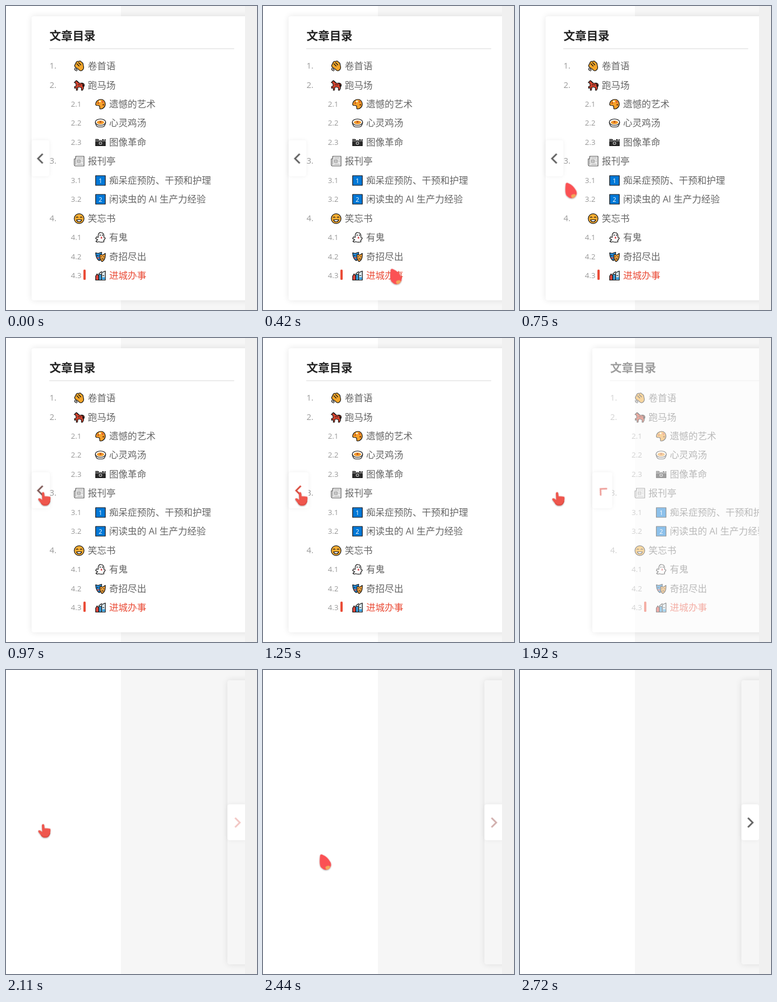
Animation of 441 by 534 pixels, one loop 3.31 s. Source, as an HTML page:

```html
<!DOCTYPE html>
<html lang="zh-CN">
<head>
<meta charset="utf-8">
<title>文章目录</title>
<style>
html, body { margin: 0; width: 100%; height: 100%; overflow: hidden; background: #fff; }
.page { position: absolute; left: 0; top: 0; width: 420px; height: 534px; overflow: hidden;
  background: linear-gradient(90deg, #fff 202px, #f6f6f6 202px); }
.scrollbar { position: absolute; left: 420px; top: 0; width: 21px; height: 534px; background: #f0f0f0; }
.panel { position: absolute; left: 45px; top: 18px; width: 390px; height: 499px; border-radius: 4px;
  box-shadow: 0 0 12px rgba(0,0,0,.1); animation-name: slide, clear; }
.content { position: absolute; inset: 0; animation-name: fade; }
.content svg { position: absolute; left: 0; top: 0; }
.toggle { position: absolute; left: 0; top: 218px; width: 31px; height: 63px; border-radius: 4px;
  background: #fff; box-shadow: 0 0 8px rgba(0,0,0,.06); 
  display: flex; align-items: center; justify-content: center; animation-name: widen; }
.toggle svg { flex: none; color: #606060; animation-name: tint; }
.toggle path { animation-name: turn; }
text { font-family: "Open Sans", "Noto Sans CJK SC", "Noto Sans CJK", sans-serif; font-size: 16.3px; fill: #666; }
.title { font-size: 20.2px; font-weight: 700; fill: #222; }
.num { font-size: 14.6px; fill: #999; }
.sub { font-size: 13.2px; }
.active { fill: #ea4d38; }
.icon { stroke: #151515; stroke-width: 1.2; stroke-linejoin: round; stroke-linecap: round; }
.icon text { font-size: 11px; fill: #fff; stroke: none; text-anchor: middle; }
.overlay { position: absolute; left: 0; top: 0; }
.cursor { animation-name: travel; }
.arrow { animation-name: arrow; }
.hand { visibility: hidden; animation-name: hand; }
.click { visibility: hidden; animation-name: click; }

.panel, .content, .toggle, .toggle svg, .toggle path, .cursor, .arrow, .hand, .click {
  animation-duration: 3310ms; animation-timing-function: linear;
  animation-iteration-count: infinite; animation-play-state: paused; }

@keyframes slide {
  0%, 56.8% { transform: translateX(0); animation-timing-function: ease; }
  63.7%, 100% { transform: translateX(344px); }
}
@keyframes turn {
  0%, 56.8% { transform: rotate(0deg); animation-timing-function: ease; }
  63.7%, 100% { transform: rotate(180deg); }
}
@keyframes clear {
  0%, 56.8% { background-color: #fff; }
  58% { background-color: rgba(255,255,255,.7); }
  62.5%, 100% { background-color: rgba(255,255,255,0); }
}
@keyframes fade {
  0%, 56.8% { opacity: 1; }
  58% { opacity: .44; }
  61.5%, 100% { opacity: 0; }
}
@keyframes widen {
  0%, 27% { width: 31px; }
  34%, 71.5% { width: 35px; }
  79%, 100% { width: 31px; }
}
@keyframes tint {
  0%, 27% { color: #606060; }
  36%, 56.8% { color: #d9483b; }
  58% { color: #ee9f9a; }
  63.7%, 71.5% { color: #f2c5c2; }
  81%, 100% { color: #606060; }
}
@keyframes travel {
  0%, 8.4% { transform: translate(312px, 516px); }
  12.4% { transform: translate(230px, 466px); }
  16.6% { transform: translate(146px, 402px); }
  20.5% { transform: translate(92px, 336px); }
  22.6% { transform: translate(80.5px, 311px); }
  24.8% { transform: translate(73px, 289px); }
  29%, 71% { transform: translate(65px, 270.5px); }
  71.6% { transform: translate(72px, 289px); }
  75.8% { transform: translate(128px, 358px); }
  80% { transform: translate(205px, 490px); }
  82%, 100% { transform: translate(225px, 560px); }
}
@keyframes arrow {
  0%, 8.4% { visibility: hidden; animation-timing-function: step-end; }
  8.41% { visibility: visible; animation-timing-function: step-end; }
  26.5% { visibility: hidden; animation-timing-function: step-end; }
  71.5% { visibility: visible; animation-timing-function: step-end; }
  82%, 100% { visibility: hidden; }
}
@keyframes hand {
  0% { visibility: hidden; animation-timing-function: step-end; }
  26.5% { visibility: visible; animation-timing-function: step-end; }
  71.5%, 100% { visibility: hidden; }
}
@keyframes click {
  0% { visibility: hidden; animation-timing-function: step-end; }
  53.7% { visibility: visible; animation-timing-function: step-end; }
  57%, 100% { visibility: hidden; }
}
</style>
</head>
<body>
<div class="page">
  <div class="panel">
    <div class="content">
      <svg width="390" height="499" viewBox="45 18 390 499">
        <text class="title" x="76.5" y="59.5">文章目录</text>
        <path d="M76 75H401" stroke="#ececec" stroke-width="2"/>
        <g id="rows"></g>
        <rect class="active" x="136" y="463" width="4" height="18" rx="1.5"/>
      </svg>
    </div>
    <div class="toggle">
      <svg width="30" height="30" viewBox="-14.5 -15 30 30">
        <path d="M4-8.300L-4.300 0L4 8.300" fill="none" stroke="currentColor" stroke-width="2.8"/>
      </svg>
    </div>
  </div>
</div>
<div class="scrollbar"></div>
<svg class="overlay" width="441" height="534">
  <g class="cursor" style="filter: drop-shadow(0 1px 1px rgba(0,0,0,.3))">
    <g class="arrow">
      <path d="M0 2Q1-1 4 .5Q13 4 18.500 14Q21.500 21 15 26Q8 29.500 2 23Q-2 20 0 2Z" fill="#fb5154"/>
      <path d="M9.500 22Q14 18.500 18 21.500Q17 25.500 12.500 27Q9 26 9.500 22Z" fill="#f3a75c"/>
    </g>
    <g class="hand">
      <path d="M-2 2.500Q-2 .2 .2 .2T2.300 2.500L2.800 7.500Q8 7 13 8.500Q14 16 10.500 21Q8 24.500 3 24Q-1 24-3.500 20L-8 14Q-9.500 11.500-6.500 11Q-4 11-1.400 14Z" fill="#ef564d"/>
      <path d="M12 16Q11 23 3.500 23Q-1 23-3 19.500" fill="none" stroke="#d9473f" stroke-width="1.500"/>
    </g>
  </g>
  <circle class="click" cx="64.500" cy="271" r="15" fill="rgba(255,238,0,.5)"/>
</svg>
<script>
const shape = (d, fill = 'none') => `<path d="${d}" fill="${fill}"/>`;
const dot = (x, y, r, fill) => `<circle cx="${x}" cy="${y}" r="${r}" fill="${fill}"/>`;
const box = (x, y, w, h, fill) => `<rect x="${x}" y="${y}" width="${w}" height="${h}" fill="${fill}"/>`;
const plain = s => `<g stroke="none">${s}</g>`;
const keycap = n => box(-8.5, -8.5, 17, 17, '#0078d7') + `<text y="4">${n}</text>`;

const icons = {
  wave: shape('M-8-1L-5-7Q-3-9-1-8L1-9Q3-9 4-7Q7-6 7-3L8 2Q8 7 3 8.500Q0 8-2 5L-7 2Z', '#f4a62a') +
    shape('M-4-4L0 0M-1-6L3-2M-8 4Q-8 8-4 8.500M-6 4Q-5 6-3 7'),
  horse: shape('M-8.500-5L-5-8.500L-2-6Q0-3 3-4Q8-5 9-1L8 2L6 0L8 4L6 8.500H4L4 4L1 3H-2L-3 8.500H-5L-5 4L-8 5L-8 2L-5 1L-6-4Z', '#d9452f') +
    shape('M-4-8L0-4M4-4L9 1M-2-1H3', 'none'),
  palette: shape('M1-8.500C6-8.500 8.500-4 8.500 0S5 8.500 0 8.500C-3 8 0 5-2 3S-8.500 4-8.500 0S-5-8.500 1-8.500Z', '#f6a12a') +
    plain(dot(-4, -2, 1.4, '#c2501f') + dot(-1, -5, 1.4, '#fff') + dot(4, -4, 1.4, '#d9452f') + dot(5, 1, 1.4, '#7a3b12')),
  soup: shape('M-9-1Q-8 7-3 7H3Q8 7 9-1Z', '#f4f4f4') +
    '<ellipse cy="-1.500" rx="9" ry="5.500" fill="#fff"/>' +
    plain('<ellipse cy="-1" rx="6.500" ry="3.300" fill="#f19a2c"/>' + dot(0, -2, 1.6, '#b7491e')),
  camera: box(-8.5, -5, 17, 11, '#2b2b2b') +
    plain(box(-9, -6, 5, 2, '#555') + box(-9, -3, 18, 1.2, '#999') + box(-3, -5.5, 6, 2, '#ddd') + dot(6.5, -4.5, 1, '#fff')) +
    dot(0, 1.5, 3.6, '#c9c9c9') + plain(dot(0, 1.5, 2, '#444')),
  paper: `<g stroke="#555">${shape('M-6-8.500H8.500V8.500H-7Q-8.500 8-8.500 6V-4H-6Z', '#f0f0f0')}</g>` +
    `<g stroke="#999">${box(-3, -2.5, 5, 5, '#ccc')}${shape('M-3-5.500H6M4.500-2H6M4.500 1H6M-3 5.500H6M-6-4V6')}</g>`,
  one: keycap(1),
  two: keycap(2),
  grin: dot(0, 0, 8.6, '#f8ad32') + shape('M-4.500 2H4.500Q3.500 5.500 0 5.500T-4.500 2Z', '#fff') +
    shape('M-5-2Q-3.500-4-2-2M2-2Q3.500-4 5-2'),
  ghost: shape('M-4-4Q-3-9 1-8.500Q6-8 6-3V0L8.500 1L7 4Q5 5 6 8Q1 9-3 7.500Q-6 9-8 7L-5 4L-8.500 2L-7-1L-4 0Z', '#fff') +
    plain(dot(-.5, -4, 1.1, '#111') + dot(3.5, -4, 1.1, '#111') + box(.5, -1, 2.5, 3, '#d9444b')),
  masks: shape('M-8.500-7L-4-6L2-8V3Q-1 4-2 7Q-8 4-8.500-7Z', '#2389d7') +
    shape('M-1-4L4-3L8.500-6Q9 2 6 6L3 8.500Q-2 6-1-4Z', '#f3a23a') +
    shape('M-6-2H-4M1 0H2M5 0H6M2 4Q4 3 5 4') + plain(box(-6, 1, 4, 2, '#d94b3b')),
  city: shape('M-8.500 8V1L-6-3L-3 1V8Z', '#e3473d') + box(-3, -2, 5, 10, '#3aa0df') +
    shape('M2 8V-5L8.500-8V8Z', '#d9e8ef') +
    shape('M-3-3L2-7M4 0H6') + plain(box(3, 3, 5, 4, '#3aa0df'))
};

const entries = [
  ['1.', 'wave', '卷首语'], ['2.', 'horse', '跑马场'],
  ['2.1', 'palette', '遗憾的艺术'], ['2.2', 'soup', '心灵鸡汤'], ['2.3', 'camera', '图像革命'],
  ['3.', 'paper', '报刊亭'],
  ['3.1', 'one', '痴呆症预防、干预和护理'], ['3.2', 'two', '闲读虫的 AI 生产力经验'],
  ['4.', 'grin', '笑忘书'],
  ['4.1', 'ghost', '有鬼'], ['4.2', 'masks', '奇招尽出'], ['4.3', 'city', '进城办事']
];

document.getElementById('rows').innerHTML = entries.map(([num, icon, label], i) => {
  const y = Math.round(105.1 + i * 33.45);
  const sub = num.length > 2;
  const dx = sub ? 37.5 : 0;
  return `<text class="num ${sub ? 'sub' : ''}" x="${76.5 + dx}" y="${y + 5}">${num}</text>
    <g class="icon" transform="translate(${128.5 + dx} ${y + .5})">${icons[icon]}</g>
    <text class="${num === '4.3' ? 'active' : ''}" x="${143.8 + dx}" y="${y + 6}">${label}</text>`;
}).join('');

// The picture changes in short bursts: first and last change, number of steps.
const LOOP = 3310;
const bursts = [[280, 750, 8], [820, 1250, 7], [1780, 2110, 6], [2370, 2720, 6]];
const ticks = [0, ...bursts.flatMap(([from, to, n]) =>
  Array.from({ length: n }, (_, k) => from + Math.ceil((to - from) * k / (n - 1) / 10) * 10))];

const animations = document.getAnimations();
const start = performance.now();

function draw() {
  const t = (performance.now() - start) % LOOP;
  const time = ticks.findLast(tick => tick <= t);
  for (const a of animations) a.currentTime = time;
  requestAnimationFrame(draw);
}
draw();
</script>
</body>
</html>
```
